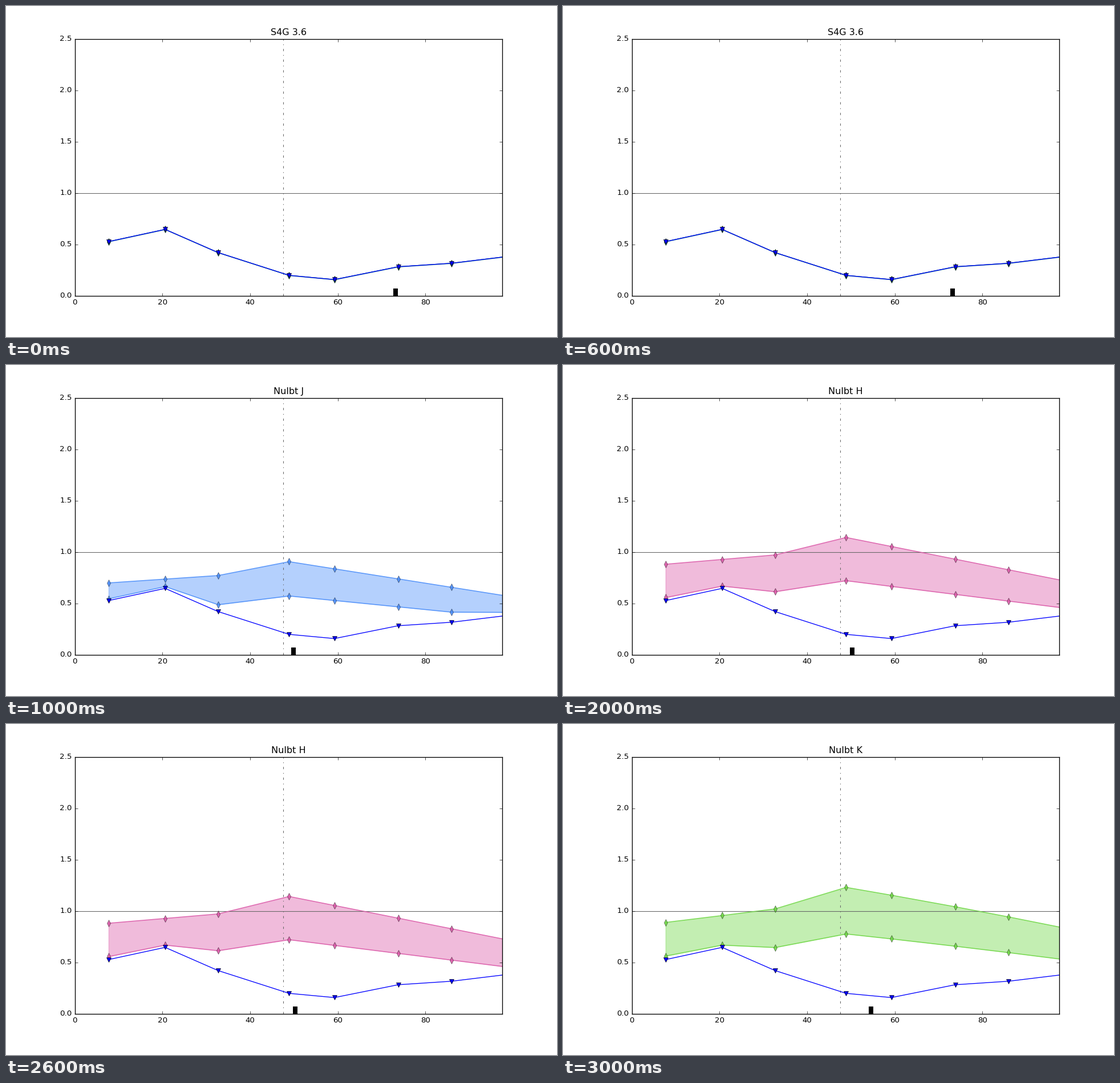
Animation, 966 px wide and 580 px high, one loop 4 s. Source, as a matplotlib script:

```python
import matplotlib.pyplot as plt
import numpy as np
from matplotlib.animation import FuncAnimation

WIDTH, HEIGHT, DPI = 966, 580, 96
LEFT, BOTTOM, RIGHT, TOP = 120.75, 72.4, 869.6, 522

plt.style.use("classic")
plt.rcParams.update({
    "font.family": "DejaVu Sans",
    "font.size": 10,
    "savefig.dpi": "figure",
    "figure.facecolor": "white",
})

# Measured points; the last one lies beyond the right edge.
radius, measured = np.transpose([
    (7.7, 0.527), (20.6, 0.646), (32.7, 0.420), (48.9, 0.198),
    (59.25, 0.157), (73.8, 0.282), (85.95, 0.316), (101, 0.394),
])
BAND_RATIO = 1.584

# title, colour, marked radius, strength, gain in strength per unit of radius
MODELS = [
    ("S4G 3.6", (0.16, 0.58, 0.45), 73.2, 0, 0),
    ("Nulbt J", (0.27, 0.54, 0.98), 49.9, 1, 0),
    ("Nulbt H", (0.855, 0.335, 0.65), 50.3, 1.26, 0),
    ("Nulbt K", (0.42, 0.84, 0.25), 54.6, 1.255, 0.0021),
]


def model_band(strength, gain):
    """Lower and upper curve, neither falling below the measured one."""
    profile = np.interp(radius, [7.7, 32.7, 48.9, 101],
                        [0.70, 0.772, 0.907, 0.556])
    upper = profile * (strength + gain * radius)
    floor = measured + 0.018 * strength
    return np.maximum(upper / BAND_RATIO, floor), np.maximum(upper, floor)


fig = plt.figure(figsize=(WIDTH / DPI, HEIGHT / DPI), dpi=DPI)
ax = fig.add_axes([LEFT / WIDTH, BOTTOM / HEIGHT,
                   (RIGHT - LEFT) / WIDTH, (TOP - BOTTOM) / HEIGHT])


def draw(index):
    title, color, mark, strength, gain = MODELS[index]
    lower, upper = model_band(strength, gain)
    ax.clear()
    ax.set_title(title)
    ax.axhline(1, color="0.4", linewidth=0.8)
    ax.axvline(47.53, color="0.4", linewidth=0.8, linestyle="-.")
    ax.fill_between(radius, lower, upper, color=color, alpha=0.4)
    for curve in (lower, upper):
        ax.plot(radius, curve, "d-", color=(*color, 0.85),
                markeredgecolor=(0, 0, 0, 0.6))
    ax.plot(radius, measured, "v-", color="blue")
    ax.axvline(mark, ymax=0.02, color="black", linewidth=6)
    ax.set_xlim(0, 97.5)
    ax.set_ylim(0, 2.5)
    return []


animation = FuncAnimation(fig, draw, frames=len(MODELS), interval=1000,
                          init_func=lambda: draw(0), repeat=True)
plt.show()
```
